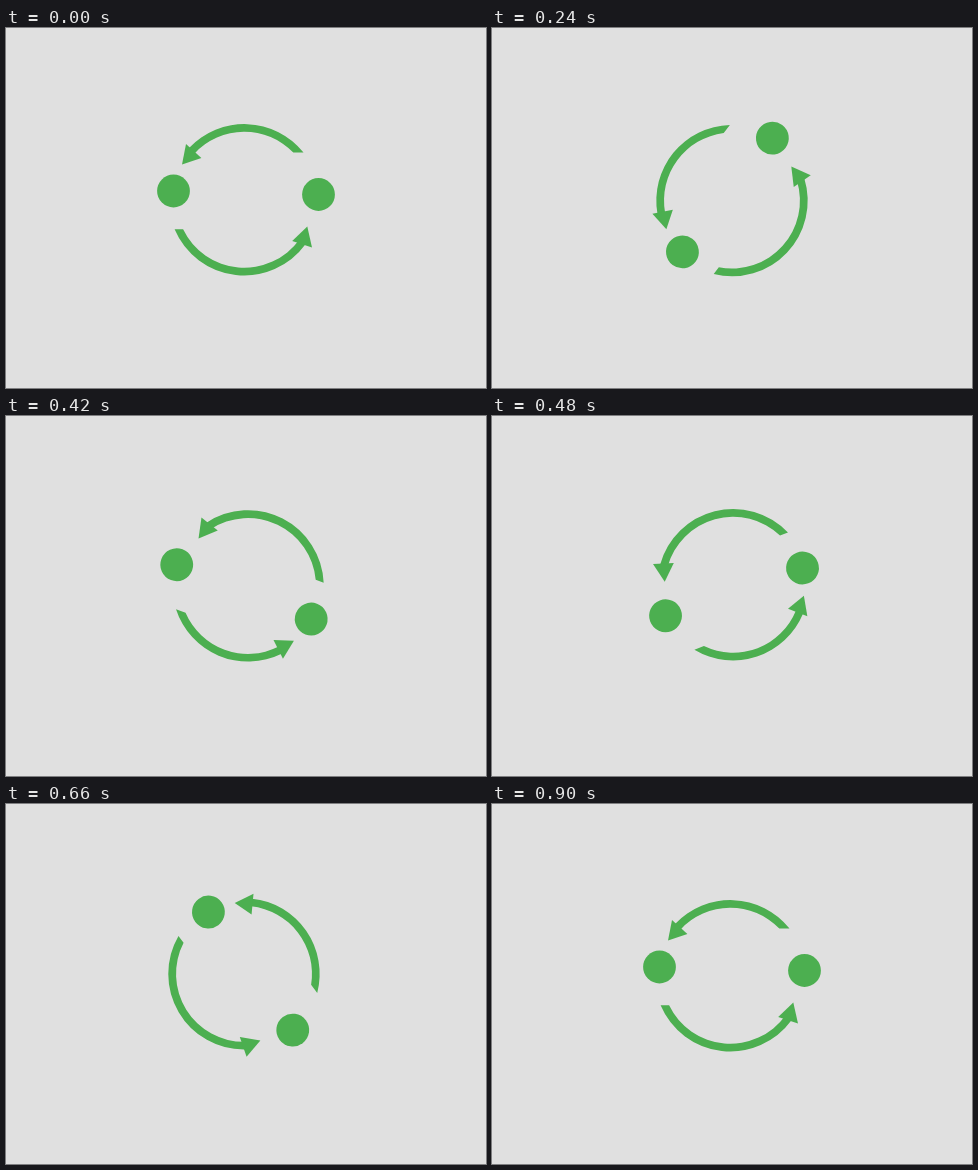
Write an HTML page that moves like this. It is 480 by 360 pixels and loops after 1.38 s.

```html
<!DOCTYPE html>
<html lang="en">
<head>
<meta charset="utf-8">
<title>Swap</title>
<style>
html, body { margin: 0; width: 100%; height: 100%; overflow: hidden; background: #e0e0e0; }
svg { display: block; width: 100%; height: 100%; }
</style>
</head>
<body>
<svg viewBox="0 0 480 360">
  <g id="icon" fill="#4caf50">
    <circle cx="167.5" cy="163" r="16.4"/>
    <circle cx="312.5" cy="166.5" r="16.4"/>
    <path d="M297.5 124.6A75.7 75.7 0 0 0 183 120.1L188.6 125.4A68 68 0 0 1 287.3 124.6Z"/>
    <path d="M176 136.5L180 116L195.4 130Z"/>
    <path d="M168.6 201.3A75.7 75.7 0 0 0 299.5 216.3L293.3 211.7A68 68 0 0 1 177.1 201.3Z"/>
    <path d="M301.3 198.6L286.2 213L306 219.4Z"/>
  </g>
</svg>
<script>
const LOOP = 1380, SPIN = 900, STEP = 30;
const icon = document.getElementById('icon');

// cubic-bezier(.42, 0, .58, 1), solved for its parameter by bisection
function easeInOut(x) {
  let lo = 0, hi = 1, s;
  for (let i = 0; i < 30; i++) {
    s = (lo + hi) / 2;
    if (1.26 * s - 0.78 * s * s + 0.52 * s ** 3 < x) lo = s; else hi = s;
  }
  return s * s * (3 - 2 * s);
}

function draw() {
  const t = Math.floor(performance.now() % LOOP / STEP) * STEP;
  const turn = t < SPIN ? easeInOut(t / SPIN) : 0;
  icon.setAttribute('transform', `rotate(${-360 * turn} 240 170.5)`);
  requestAnimationFrame(draw);
}
draw();
</script>
</body>
</html>
```
